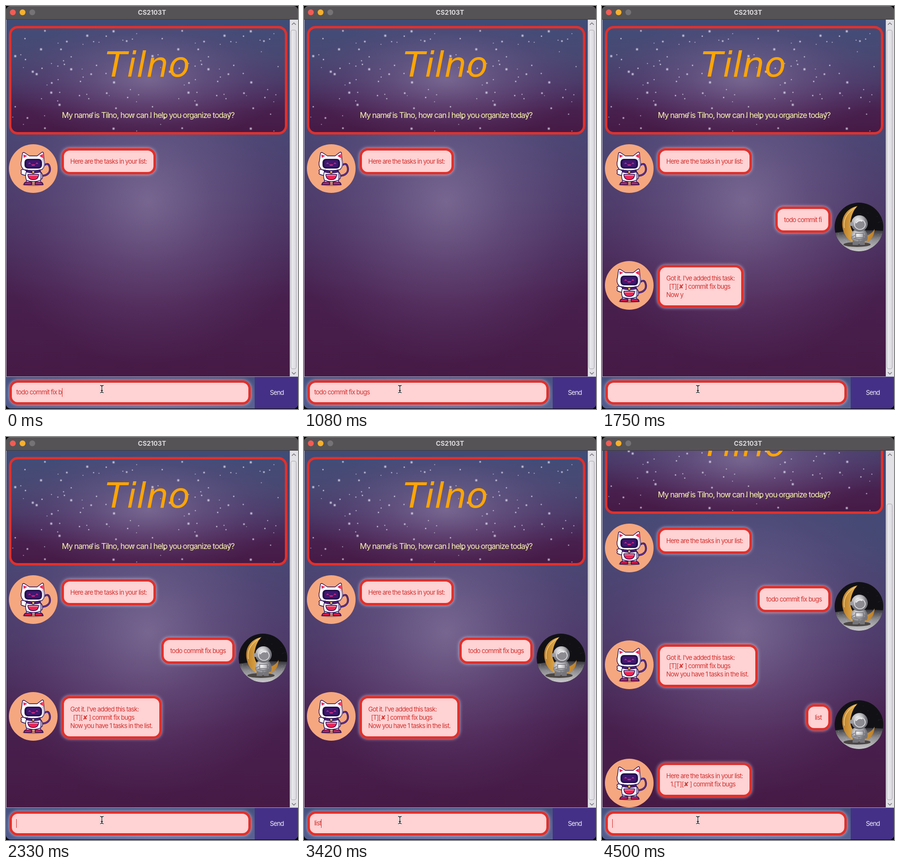
An HTML page for the animation above (4.58 s loop, 600 by 828 pixels).

```html
<!DOCTYPE html>
<html lang="en">
<head>
<meta charset="utf-8">
<title>Chat window</title>
<style>
  html, body { margin: 0; width: 100%; height: 100%; overflow: hidden; background: #000; }
  #stage { position: relative; width: 600px; height: 828px; overflow: hidden; background: #000;
    font: 13px/17px Inter, "Noto Sans", sans-serif; letter-spacing: -.06em; }
  #stage div, #stage svg { position: absolute; box-sizing: border-box; }
  #bar { left: 0; top: 0; width: 600px; height: 28px; background: #565356; border-top: 1px solid #757275;
    border-bottom: 1px solid #3b383c; border-radius: 9px 9px 0 0;
    color: #dddbdd; font-weight: 700; text-align: center; line-height: 24px; letter-spacing: 0; }
  #bar i { position: absolute; top: 6px; width: 12px; height: 12px; border-radius: 50%; }
  #view { left: 0; top: 28px; width: 583px; height: 733px; overflow: hidden; border-left: 1px solid #b9b7c2;
    background: radial-gradient(circle 335px at 50% 51%, rgba(142,124,164,.66), rgba(125,102,150,.42) 40%, rgba(108,78,132,.2) 75%, transparent),
      linear-gradient(#404c76, #474874 28%, #4a3a68 52%, #48204e 78%, #461a45); }
  #list { left: -1px; top: -28px; width: 600px; height: 900px; }
  #head { left: 6px; top: 41px; width: 572px; height: 223px; border: 5px solid #e1302b; border-radius: 18px; overflow: hidden;
    background: radial-gradient(ellipse 285px 130px at 50% 49%, rgba(142,124,164,.66), rgba(125,102,150,.42) 40%, rgba(108,78,132,.2) 75%, transparent),
      linear-gradient(#434c77, #484872 28%, #4a3a68 52%, #48204e 80%, #461a45); }
  .bubble { border: 5px solid #e1302b; border-radius: 17px; background: #ffd2d4; color: #d2332f;
    box-shadow: 0 0 7px rgba(235,220,240,.75); }
  .says { top: 8px; padding: 13.5px 13.5px; white-space: pre; min-height: 54px; }
  .says b { font: 13px/13px "DejaVu Sans", sans-serif; }
  .row { left: 0; width: 584px; height: 100px; }
  .row svg { top: 0; width: 100px; height: 100px; }
  .bot svg { left: 6px; }
  .bot .says { left: 113.5px; }
  .me svg { left: 478px; }
  .me .says { right: 114px; }
  #scroll { left: 583px; top: 28px; width: 17px; height: 733px; background: #e2e1e6; border-left: 1px solid #cbc9d0; }
  #thumb { left: 1px; width: 12px; border: 1px solid #adabb2; border-radius: 4px; background: linear-gradient(90deg, #ebeaee, #dbdadf); }
  #foot { left: 0; top: 761px; width: 600px; height: 66px; overflow: hidden; border-top: 1px solid #a5a3bd; border-radius: 0 0 9px 9px;
    background: radial-gradient(ellipse 330px 80px at 50% 100%, #696d9b, transparent), linear-gradient(#46517f, #505b8d); }
  #field { left: 7px; top: 7px; width: 496px; height: 50px; padding: 11px 9px; white-space: pre; }
  #field i { display: inline-block; width: 1px; height: 18px; margin: 0 -1px 0 0; vertical-align: -5px; background: #d2332f; }
  #send { left: 511px; top: 0; width: 89px; height: 66px; background: #443187; color: #f4f0fb; text-align: center; line-height: 64px; padding-left: 2px; }
</style>
</head>
<body>
<div id="stage">
  <div id="view"><div id="list">
    <div id="head"></div>
    <svg width="600" height="270" style="left:0;top:0">
      <g id="stars" fill="#f1edff"></g>
      <text x="291" y="145" text-anchor="middle" fill="#ffa500" font-family="'DejaVu Sans', sans-serif" font-style="oblique" font-size="72" letter-spacing="0">Tilno</text>
      <text x="292" y="230" text-anchor="middle" fill="#fbf5ac" font-size="16" letter-spacing="-.96">My name is Tilno, how can I help you organize today?</text>
    </svg>
  </div></div>
  <div id="scroll">
    <svg width="16" height="733" style="left:0;top:0" fill="none" stroke="#66636a" stroke-width="1.2"><path d="M3.500 10.500l4-4 4 4M3.500 724.500l4 4 4-4"/></svg>
    <div id="thumb"></div>
  </div>
  <div id="foot"><div id="field" class="bubble"></div><div id="send">Send</div></div>
  <div id="bar">CS2103T<i style="left:8px;background:#f25c54"></i><i style="left:28px;background:#f6b02b"></i><i style="left:48px;background:#767376"></i></div>
  <svg width="12" height="20" style="left:191px;top:777px" fill="none">
    <defs><path id="beam" d="M2.500 2.500Q6 2.500 6 5V15Q6 17.500 2.500 17.500M9.500 2.500Q6 2.500 6 5M6 15Q6 17.500 9.500 17.500M4 13h4"/></defs>
    <use href="#beam" stroke="#fff" stroke-width="3"/>
    <use href="#beam" stroke="#111" stroke-width="1.3"/>
  </svg>
  <svg width="0" height="0">
    <defs>
      <clipPath id="round"><circle cx="50" cy="50" r="50"/></clipPath>
      <linearGradient id="ground" x2="0" y2="1"><stop stop-color="#33333a"/><stop offset=".45" stop-color="#8d8c90"/><stop offset="1" stop-color="#c9c8ca"/></linearGradient>
      <linearGradient id="gold"><stop stop-color="#bb7d27"/><stop offset=".35" stop-color="#dea84a"/><stop offset="1" stop-color="#bd8029"/></linearGradient>
      <radialGradient id="silver" cx=".4" cy=".3"><stop stop-color="#f4f4f5"/><stop offset=".6" stop-color="#b7b7bb"/><stop offset="1" stop-color="#75757c"/></radialGradient>
    </defs>
    <symbol id="cat" viewBox="0 0 100 100">
      <circle cx="50" cy="50" r="50" fill="#f5a77f"/>
      <ellipse cx="50" cy="83" rx="22" ry="3" fill="#bd7260"/>
      <path id="tail" d="M66 65C80 65 86 57 84 48S78 40 74 42" fill="none" stroke="#2a1259" stroke-width="3.800" stroke-linecap="round"/>
      <path d="M66 65C80 65 86 57 84 48S78 40 74 42" fill="none" stroke="#713aa0" stroke-width="1.500" stroke-linecap="round"/>
      <g stroke="#2a1259" stroke-width="1.4" stroke-linejoin="round">
        <path d="M36 72h11v11H31q0-5 5-5zM54 72h11v6q5 0 5 5H54z" fill="#f0eef9"/>
        <path d="M31 83q0-5 6-5h9v5zM54 83v-5h9q6 0 7 5z" fill="#e3194a"/>
        <path d="M37 57q-4-6-10-5-4 2-1 5-3 3 1 5 4 2 9 2zM63 56q7 3 6 12-1 5-5 4z" fill="#fff"/>
        <path d="M37 54h27q4 11 1 20-15 6-29 0-4-10 1-20z" fill="#fff"/>
        <path d="M27 25L28 18q2-2 5 0l9 6h16l9-7q3-2 4 1l1 14q4 13-4 20-19 5-38 0-8-8-4-19z" fill="#fff"/>
        <path d="M37 53q14 4 27 0l1 4q-15 4-29 0z" fill="#5c217f"/>
        <circle cx="50" cy="57" r="3" fill="#ffb92e"/>
        <path d="M39 62h22q0 11-11 11T39 62z" fill="#ee2454"/>
      </g>
      <path d="M29.500 21l1 7 7-4zM69.500 20l-7 4 8 5z" fill="#ee2454"/>
      <path d="M67 29q5 12 1 21l3-2q4-8 0-18zM62 62q3 6 0 12h2q2-7 0-15z" fill="#cbc6e5"/>
      <rect x="32" y="30" width="36" height="20" rx="7" fill="#25104f"/>
      <rect x="36" y="33" width="28" height="14" rx="4" fill="#3f1770"/>
      <g fill="none" stroke="#f72c80" stroke-width="1.500" stroke-linecap="round">
        <path d="M41 40q1.500-3 3 0M56 40q1.500-3 3 0M47 42q1.500 2.500 3 0 1.500 2.500 3 0"/>
      </g>
      <path d="M40 64h20" stroke="#ffb3be" stroke-width="1.500"/>
    </symbol>
    <symbol id="moon" viewBox="0 0 100 100">
      <g clip-path="url(#round)">
        <path d="M0 0h100v100H0z" fill="#111115"/>
        <path d="M0 62Q50 54 100 58V100H0z" fill="url(#ground)"/>
        <g id="dust" fill="#eeeef0"></g>
        <ellipse cx="46" cy="86" rx="28" ry="5" fill="#4c4744"/>
        <path d="M47 7C24 12 13 30 16 50 20 76 40 86 56 84 72 82 82 70 82 54 76 66 64 70 54 70 38 68 30 52 33 36 36 22 40 14 47 7z" fill="url(#gold)"/>
        <path d="M44 10C26 18 17 34 20 52" fill="none" stroke="#efca7c" stroke-width="1.600"/>
        <path d="M39 57h24q7 10 4 21l-5 1v8H52l-1-7-3 7H37V77l-3-3q-1-9 5-17z" fill="url(#silver)"/>
        <path d="M43 63h16v9H43zM39 73q12 5 24 0M50 76v10M35 71l7-4M66 71l-6-4" fill="none" stroke="#717178" stroke-width="1.400"/>
        <circle cx="51" cy="43" r="17" fill="url(#silver)"/>
        <ellipse cx="52" cy="45" rx="11" ry="10" fill="#8b8b91" stroke="#dddde0" stroke-width="1.600"/>
        <path d="M44 42q5-7 13-4" fill="none" stroke="#ededf0" stroke-width="2.500"/>
        <circle cx="35" cy="44" r="4" fill="#9d9da3"/>
      </g>
    </symbol>
  </svg>
</div>
<script>
const $ = id => document.getElementById(id);
const LOOP = 4580, TYPE = 850, SENT = [1166, 3481];
const TASK = "[T][✘ ] commit fix bugs", CMD = "todo commit fix bugs";
const GREET = "Here are the tasks in your list:";

// who, top, when it starts typing, text
const rows = [
  ["bot", 284, -TYPE, GREET],
  ["me", 404, SENT[0], CMD],
  ["bot", 524, SENT[0], `Got it. I've added this task:\n  ${TASK}\nNow you have 1 tasks in the list.`],
  ["me", 647, SENT[1], "list"],
  ["bot", 767, SENT[1], `${GREET}\n   1.${TASK}`]
].map(([who, top, start, text]) => {
  const el = document.createElement("div");
  el.className = "row " + who;
  el.style.top = top + "px";
  el.innerHTML = `<svg><use href="#${who === "bot" ? "cat" : "moon"}"/></svg><div class="bubble says"></div>`;
  $("list").append(el);
  return { el, start, text, says: el.lastChild };
});

const keys = [
  [0, CMD.slice(0, -3)], [170, CMD.slice(0, -2)], [290, CMD.slice(0, -1)], [420, CMD],
  [SENT[0], ""], [2900, "l"], [3030, "li"], [3150, "lis"], [3250, "list"], [SENT[1], ""]
];

let seed = 7;
const rnd = () => (seed = seed * 16807 % 2147483647) / 2147483647;
const dot = (x, y, r, o) => `<circle cx="${x}" cy="${y}" r="${r}" opacity="${o}"/>`;

// One patch of sky, repeated every 282 x 200.
const sky = [[19,103],[39,67],[80,51],[72,89],[74,128],[94,158],[93,178],[40,110],[125,73],[134,130],
  [153,155],[113,89],[167,61],[186,122],[207,179],[222,157],[206,62],[248,72],[55,135],[151,184],
  [226,210],[110,203],[19,207],[178,220],[221,52],[250,188],[44,230],[63,140],[120,120],[175,140]]
  .map(([x, y], i) => [x, y, [1.9, 1.2, 1.5][i % 3]]);
for (let i = 0; i < 34; i++) sky.push([14 + rnd() * 280, 46 + rnd() * 198, .6 + rnd() * .5]);
let stars = "";
for (const [x, y, r] of sky)
  for (const px of [x, x + 282])
    for (const py of [y, y + 200])
      if (px < 571 && py < 257) stars += dot(px, py, r * 1.7, .2) + dot(px, py, r, .62);
$("stars").innerHTML = stars;

let dust = "";
for (let i = 0; i < 90; i++) dust += dot(rnd() * 100, 64 + rnd() * 36, .5, .45);
for (let i = 0; i < 16; i++) dust += dot(rnd() * 100, rnd() * 50, .4, .4);
$("dust").innerHTML = dust;

const mark = s => s.replace("✘", "<b>✘</b>");

function draw(t) {
  for (const { el, start, text, says } of rows) {
    const part = Math.min(1, (t - start) / TYPE);
    el.style.display = part < 0 ? "none" : "";
    if (part >= 0) says.innerHTML = mark(text.slice(0, Math.round(text.length * part)));
  }
  const [pressed, typed] = keys.filter(k => k[0] <= t).pop();
  const caret = (t - pressed) % 1000 < 500;
  $("field").innerHTML = typed + (caret ? "<i></i>" : "");

  const down = t >= SENT[1];
  $("list").style.top = (down ? -134 : -28) + "px";
  $("thumb").style.top = (down ? 109 : 21) + "px";
  $("thumb").style.height = (down ? 609 : 697) + "px";
}

// The screen refreshes 12 times a second.
let last = -1;
const begin = performance.now();
function tick() {
  const step = Math.floor(((performance.now() - begin) % LOOP + 4) * .012) % 55;
  if (step !== last) draw((last = step) * 1000 / 12);
  requestAnimationFrame(tick);
}
tick();
</script>
</body>
</html>
```
